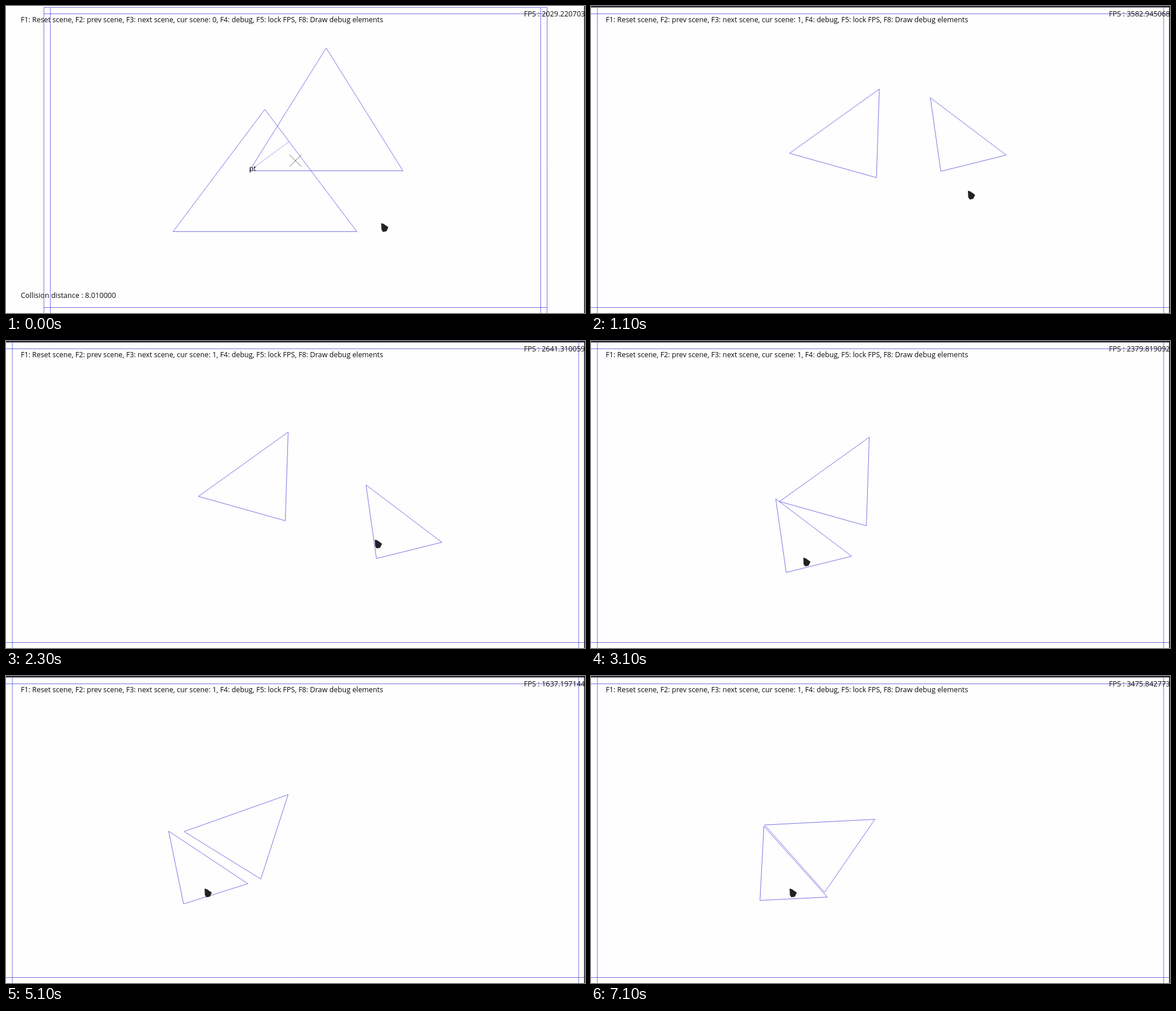
Recreate the animation shown at these times as an HTML page with a canvas. Size 1000 px wide and 530 px high, loop 7.2 s.

```html
<!DOCTYPE html>
<html lang="en">
<head>
<meta charset="utf-8">
<title>Triangle collision demo</title>
<style>
  html, body { margin: 0; width: 100%; height: 100%; overflow: hidden; background: #fefefe; }
  canvas { display: block; }
</style>
</head>
<body>
<canvas id="stage" width="1000" height="530"></canvas>
<script>
const ctx = document.getElementById('stage').getContext('2d');
const LOOP = 7200, STEP = 100, SCENE_CHANGE = 400;
const FIRST_HIT = 4050, SECOND_HIT = 5720;
const BLUE = 'rgba(48, 48, 216, 0.66)', INK = '#0c0c0c';

// Corners relative to the centroid.
const largeShape = [[53.3, -88], [-101.7, 23], [48.3, 65]];
const smallShape = [[-49.7, -75.3], [81.3, 23.7], [-31.7, 51.7]];

const fpsReadings = ['2029.220703', '3582.945068', '2641.310059', '2379.819092',
  '1637.197144', '3405.994629', '3475.842773'];

const clamp = (v, min, max) => Math.min(max, Math.max(min, v));
const ramp = (t, from, to) => clamp((t - from) / (to - from), 0, 1);

// Smooth path through points spaced evenly in time, resting at both ends.
function glide(t, start, spacing, points) {
  const last = points.length - 1;
  const position = clamp((t - start) / spacing, 0, last);
  const i = Math.min(Math.floor(position), last - 1), k = position - i;
  const [p, a, b, n] = [i - 1, i, i + 1, i + 2].map(j => points[clamp(j, 0, last)]);
  return a.map((v, d) => v + k / 2 * (b[d] - p[d] +
    k * (2 * p[d] - 5 * v + 4 * b[d] - n[d] + k * (3 * (v - b[d]) + n[d] - p[d]))));
}

// The large triangle drifts with slight drag and spins after the first hit.
function largePose(t) {
  const s = (t - 1100) / 1000, drift = s - 0.0245 * s * s;
  const spin = 16.1 * ramp(t, FIRST_HIT, 5100) + 16.6 * ramp(t, 5100, 7100);
  return [444.2 - 9.15 * drift, 230.8 + 12 * drift, spin];
}

// The small triangle is dragged across, then turns about the cursor.
function smallPose(t) {
  const [x, y] = glide(t, 2000, 300,
    [[635.3, 233.2], [671, 323.3], [590, 453], [440, 372], [345, 341], [335, 338.7]]);
  const turn = ramp(t, FIRST_HIT, SECOND_HIT), back = ramp(t, SECOND_HIT, 7100);
  return [x - 0.6 * turn - 2 * back, y + 1.2 * turn + 2.4 * back, -5.6 * turn + 16.7 * back];
}

function cursorTip(t) {
  if (t < 1400) return glide(t, 300, 800, [[648, 375], [651, 319]]);
  return glide(t, 1400, 300, [[651, 319], [645, 275], [648, 265], [637, 343],
    [590, 478], [425, 396], [350, 369], [343, 367]]);
}

function place(shape, [x, y, degrees]) {
  const r = degrees * Math.PI / 180, c = Math.cos(r), s = Math.sin(r);
  return shape.map(([px, py]) => [x + px * c - py * s, y + px * s + py * c]);
}

function trace(points) {
  ctx.beginPath();
  points.forEach(([x, y]) => ctx.lineTo(x + 0.5, y + 0.5));
}

function polygon(points) {
  trace(points);
  ctx.closePath();
  ctx.strokeStyle = BLUE;
  ctx.stroke();
}

function line(x1, y1, x2, y2, color = BLUE) {
  trace([[x1, y1], [x2, y2]]);
  ctx.strokeStyle = color;
  ctx.stroke();
}

function label(text, x, y, size = 12.35) {
  ctx.font = `${size}px "Open Sans", "Noto Sans", sans-serif`;
  ctx.fillStyle = INK;
  ctx.fillText(text, x, y);
}

function drawWalls(columns, rows, left, right) {
  columns.forEach(x => line(x, 2, x, 530));
  rows.forEach(y => line(left, y, right, y));
}

function drawOverlapScene() {
  drawWalls([65, 76, 923, 934], [2, 13, 520], 65, 934);
  polygon([[552.5, 72], [685, 284], [420, 284]]);
  polygon([[446.5, 178], [605.5, 389], [288, 389]]);
  line(420, 284, 488, 234, 'rgba(80, 80, 220, 0.5)');
  line(489, 256, 510, 277, '#777');
  line(489, 277, 510, 256, '#777');
  label('pt', 420, 284.5);
  label('Collision distance : 8.010000', 25.4, 504, 12.5);
}

function drawDragScene(t) {
  drawWalls([10.5, 988.5], [13, 520], -1, 999);
  polygon(place(largeShape, largePose(t)));
  polygon(place(smallShape, smallPose(t)));
  ctx.fillStyle = '#2b2530';
  ctx.fillRect(0, 0, 1000, 2.5);
}

function drawCursor([x, y]) {
  trace([[0, 0], [4, 1], [12.5, 7], [9, 14], [3, 15], [0.5, 11]]
    .map(([dx, dy]) => [x + dx - 0.5, y + dy - 0.5]));
  ctx.fillStyle = '#222';
  ctx.fill();
}

function draw(t) {
  const scene = t < SCENE_CHANGE ? 0 : 1;
  ctx.fillStyle = '#fefefe';
  ctx.fillRect(0, 0, 1000, 530);
  ctx.lineWidth = 1;

  if (scene === 0) drawOverlapScene();
  else drawDragScene(t);

  label(`F1: Reset scene, F2: prev scene, F3: next scene, cur scene: ${scene}, ` +
    'F4: debug, F5: lock FPS, F8: Draw debug elements', 25.4, 28);
  label('FPS : ' + fpsReadings[Math.round(t / 1200)], 894.5, 18, 12.5);
  drawCursor(cursorTip(t));

  // Right window border
  ctx.fillStyle = '#151318';
  ctx.fillRect(998.5, 0, 1.5, 530);
}

function tick() {
  const t = performance.now() % LOOP;
  draw(Math.floor(t / STEP) * STEP);
  requestAnimationFrame(tick);
}
tick();
</script>
</body>
</html>
```
